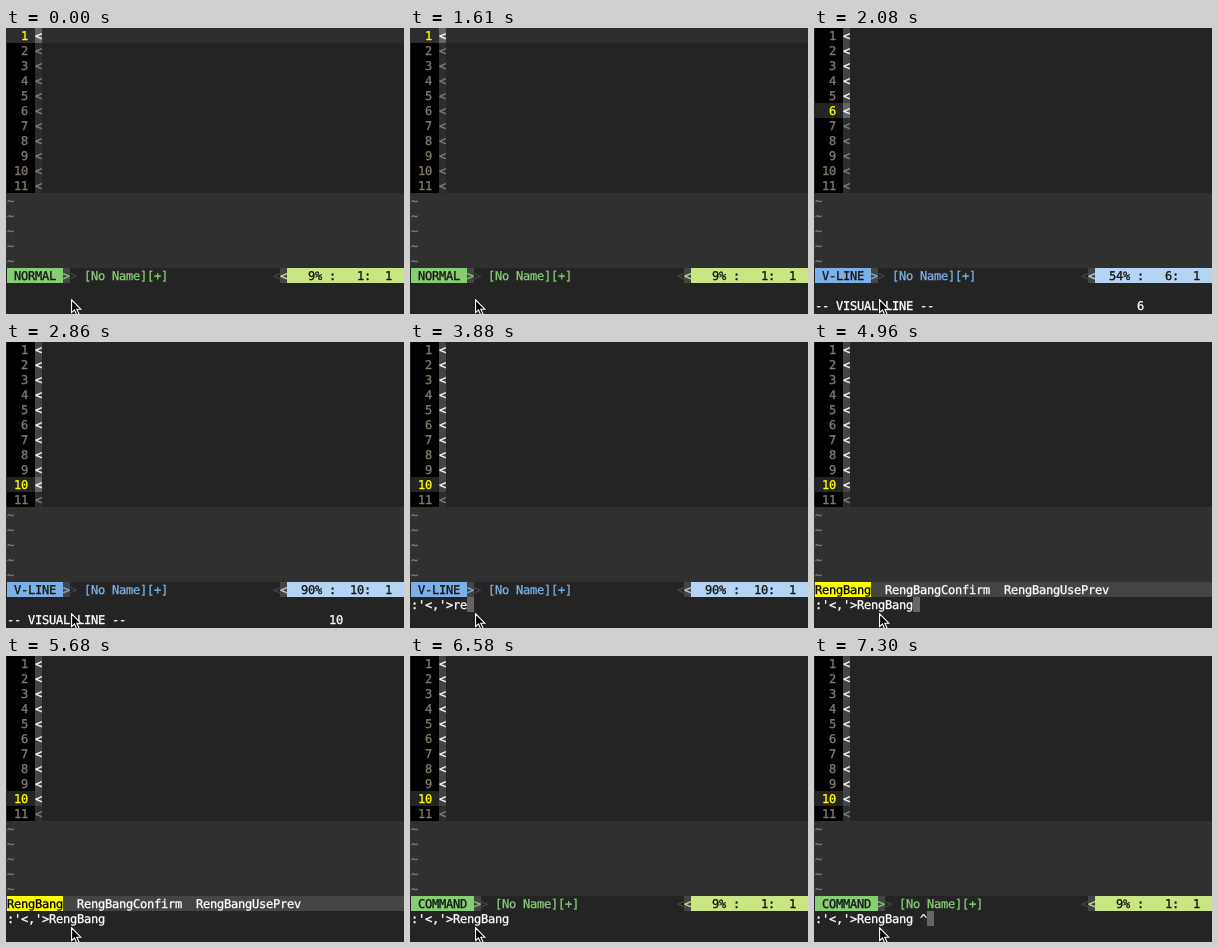
These frames come from a looping animation (398x286 px, 8 s). An HTML page:

```html
<!DOCTYPE html>
<html lang="en">
<head>
<meta charset="utf-8">
<title>Visual line command</title>
<style>
  html, body { margin: 0; width: 100%; height: 100%; overflow: hidden; background: #242424; }
  #stage { position: relative; width: 398px; height: 286px; overflow: hidden; background: #242424; }
  #screen span {
    position: absolute; height: 15px; white-space: pre;
    font: 12px/17px "DejaVu Sans Mono", "Liberation Mono", monospace;
    letter-spacing: -0.224px;
    font-variant-ligatures: none;
    text-rendering: geometricPrecision;
    -webkit-text-stroke: 0.3px currentColor;
  }
  #pointer { position: absolute; left: 65px; top: 271px; }
</style>
</head>
<body>
<div id="stage">
  <div id="screen"></div>
  <svg id="pointer" width="14" height="18" viewBox="0 0 14 18">
    <path d="M0.6 0.8V13.6L3.5 10.9L5.8 16L8 15L5.8 10.2H9.8Z" fill="#000" stroke="#fff" stroke-width="1.1"/>
  </svg>
</div>
<script>
const LOOP = 8000, CELL_W = 7, CELL_H = 15, LEFT = 1, WIDTH = 398;
const LINES = 11, STATUS = 16, CMD = 17, MODE = 18;
const C = {
  bg: '#242424', fg: '#ffffff', raised: '#2d2d2d', gutter: '#000', number: '#857b6f',
  dim: '#808080', blank: '#303030', visual: '#444444', cursor: '#656565',
  yellow: '#ffff00', ink: '#141413', notch: '#444444'
};
const GREEN = ['#86cd74', '#cae682'], BLUE = ['#7cb0e6', '#b5d3f3'];
const RANGE = ":'<,'>";

// Each step changes only the listed fields of the editor state.
const START = { mode: 'NORMAL', line: 1, blink: true, cmd: null, menu: false };
const STEPS = [
  [0, {}],
  [240, { blink: false }], [540, { blink: true }],
  [900, { blink: false }], [1200, { blink: true }],
  [1560, { blink: false }], [1610, { blink: true }],
  [1670, { mode: 'V-LINE' }],
  [1790, { line: 2 }], [2020, { line: 4 }], [2080, { line: 6 }],
  [2380, { line: 7 }], [2560, { line: 8 }], [2740, { line: 9 }], [2860, { line: 10 }],
  [3100, { cmd: '' }], [3880, { cmd: 're' }], [4060, { cmd: 'ren' }],
  [4240, { cmd: 'reng' }], [4480, { cmd: 'rengb' }], [4540, { cmd: 'rengba' }],
  [4600, { cmd: 'rengban' }], [4780, { cmd: 'rengbang' }],
  [4960, { cmd: 'RengBang', menu: true }], [5680, { blink: false }],
  [5860, { cmd: 'RengBang ', menu: false, mode: 'COMMAND', blink: true }],
  [6580, { blink: false }], [6820, { blink: true }], [7180, { blink: false }],
  [7300, { cmd: 'RengBang ^', blink: true }]
];
let last = START;
const STATES = STEPS.map(([at, change]) => {
  last = { ...last, ...change };
  return { at, ...last };
});

const screen = document.getElementById('screen');

function box(x, row, width, text, fg, bg) {
  const el = document.createElement('span');
  el.textContent = text;
  el.style.left = x + 'px';
  el.style.top = row * CELL_H + 'px';
  el.style.width = width + 'px';
  el.style.color = fg;
  if (bg) el.style.background = bg;
  screen.append(el);
}
const put = (col, row, text, fg, bg) =>
  box(LEFT + col * CELL_W, row, text.length * CELL_W, text, fg, bg);
const fill = (col, row, bg) => {
  const x = col ? LEFT + col * CELL_W : 0;
  box(x, row, WIDTH - x, '', bg, bg);
};

function drawBuffer(s) {
  const normal = s.mode === 'NORMAL';
  for (let n = 1; n <= LINES; n++) {
    const row = n - 1, here = n === s.line;
    if (here && normal) fill(0, row, C.raised);
    const gutter = !here ? C.gutter : normal ? C.raised : C.bg;
    put(0, row, String(n).padStart(3) + ' ', here ? C.yellow : C.number, gutter);

    const picked = !normal && n <= s.line;
    const cursor = here && s.cmd === null && s.blink;
    const bg = cursor ? C.cursor : picked ? C.visual : C.raised;
    put(4, row, '<', picked || cursor ? C.fg : C.dim, bg);
  }
  for (let row = LINES; row < STATUS; row++) {
    fill(0, row, C.blank);
    put(0, row, '~', C.dim);
  }
}

function drawStatus(s) {
  const [main, pale] = s.mode === 'V-LINE' ? BLUE : GREEN;
  const label = ` ${s.mode} `.padEnd(8), end = label.length;
  put(0, STATUS, label, C.ink, main);
  put(end, STATUS, '>', main, C.notch);
  put(end + 1, STATUS, '>', C.notch);
  put(end + 3, STATUS, '[No Name][+]', main);

  const line = s.mode === 'COMMAND' ? 1 : s.line;
  const percent = String(Math.floor(line * 100 / LINES)).padStart(4);
  put(38, STATUS, '<', C.notch);
  put(39, STATUS, '<', pale, C.notch);
  fill(40, STATUS, pale);
  put(40, STATUS, `${percent}% :${String(line).padStart(4)}:  1 `, C.ink);
}

function drawMenu() {
  fill(0, STATUS, C.visual);
  put(0, STATUS, 'RengBang', '#000', C.yellow);
  put(10, STATUS, 'RengBangConfirm', C.fg);
  put(27, STATUS, 'RengBangUsePrev', C.fg);
}

function drawCommand(s) {
  if (s.cmd !== null) {
    const text = RANGE + s.cmd;
    put(0, CMD, text, C.fg);
    if (s.blink) put(text.length, CMD, ' ', C.fg, C.cursor);
  } else if (s.mode === 'V-LINE') {
    put(0, MODE, '-- VISUAL LINE --', C.fg);
    put(46, MODE, String(s.line), C.fg);
  }
}

let shown = null;
function render(t) {
  const s = STATES.findLast(state => state.at <= t);
  if (s === shown) return;
  shown = s;
  screen.replaceChildren();
  drawBuffer(s);
  if (s.menu) drawMenu(); else drawStatus(s);
  drawCommand(s);
}

const began = performance.now();
function tick() {
  render((performance.now() - began) % LOOP);
  requestAnimationFrame(tick);
}
tick();
</script>
</body>
</html>
```
